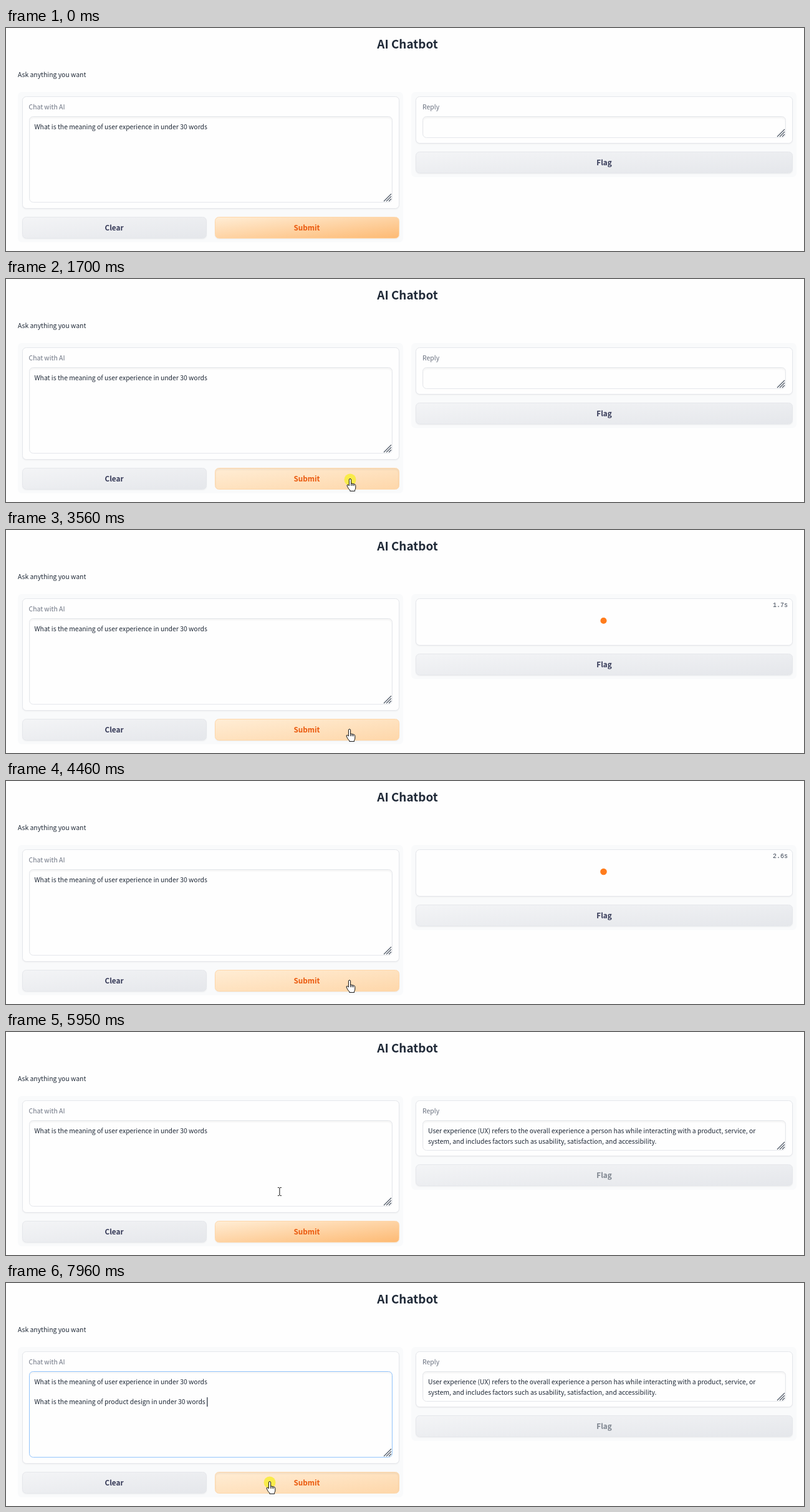
An HTML page for the animation above (7990 ms loop, 1280 by 359 pixels).

```html
<!DOCTYPE html>
<html lang="en">
<head>
<meta charset="utf-8">
<title>AI Chatbot</title>
<style>
html, body { margin: 0; width: 100%; height: 100%; overflow: hidden; background: #fefefe; }
#stage { position: absolute; left: 0; top: 0; width: 1280px; height: 359px; overflow: hidden; }
#stage div { position: absolute; box-sizing: border-box; border-radius: 6.5px; }
.panel { background: #f9fafb; }
.block, .area { background: #fefefe; border: 1px solid #e5e7eb; }
.block { box-shadow: 0 1px 2px rgba(0,0,0,.05); }
.area { box-shadow: inset 0 2px 3px rgba(0,0,0,.05); }
.area.focus { border-color: #93c5fd; }
.button { border: 1px solid #e5e7eb; background: linear-gradient(to bottom right, #f3f4f6, #e5e7eb); box-shadow: 0 1px 2px rgba(0,0,0,.05); }
.primary { border-color: #fed7aa; background: linear-gradient(to bottom right, #ffedd5, #fdba74); }
.primary.hover { background: linear-gradient(to bottom right, #ffedd5, #fed7aa); }
.primary.press { box-shadow: inset 0 2px 3px rgba(0,0,0,.06); }
svg { position: absolute; left: 0; top: 0; }
text { font: 10.4px "Noto Sans CJK JP", "Noto Sans CJK SC", "Noto Sans CJK", "Open Sans", sans-serif; fill: #1f2937; white-space: pre; }
.title { font-size: 18.9px; font-weight: 600; text-anchor: middle; }
.label { fill: #6b7280; }
.caption { font-size: 11.7px; font-weight: 600; text-anchor: middle; fill: #343856; }
.orange { fill: #ea580c; }
#timer { font: 10px "Liberation Mono", monospace; text-anchor: end; fill: #374151; }
.grip { fill: none; stroke: #4b5563; stroke-width: 1.1; }
</style>
</head>
<body>
<div id="stage">
  <svg id="top" width="1280" height="359">
    <circle id="spot" r="9.5" fill="#f8ec35"/>
    <rect id="caret" width="1.2" height="15" y="184" fill="#1f2937"/>
    <g id="mouse" stroke="#111" stroke-linejoin="round">
      <path id="hand" fill="#fff" d="M-1.6 11V1.2a1.6 1.6 0 0 1 3.2 0V7l1.9.3 1.9.5 1.8.5q1.6.6 1.6 2.2V14q0 2-1.2 3.6v1.8H-.2V18q-2.5-2-3.6-4.8l-1-2.2q-.5-1.5.9-1.9 1 0 2.3 1.9zM1.6 7v4M4 8v3M6.2 8.6v2.6"/>
      <path id="beam" fill="none" d="M-3-6.5h2l1 1 1-1h2M0-5.5v11M-3 6.5h2l1-1 1 1h2"/>
      <path id="arrow" fill="#fff" d="M0 0v15l3.5-3.3 2.3 5.3 2.2-1-2.3-5.1h4.8z"/>
    </g>
  </svg>
</div>
<script>
const LOOP = 7990;
const stage = document.getElementById('stage'), svg = document.getElementById('top');
const $ = id => document.getElementById(id);

function box(cls, x, y, w, h) {
  const el = document.createElement('div');
  el.className = cls;
  el.style.cssText = `left:${x}px;top:${y}px;width:${w}px;height:${h}px`;
  stage.insertBefore(el, svg);
  return el;
}
function node(tag, attrs, content = '') {
  const el = document.createElementNS('http://www.w3.org/2000/svg', tag);
  for (const k in attrs) el.setAttribute(k, attrs[k]);
  el.textContent = content;
  svg.insertBefore(el, $('spot'));
  return el;
}
const label = (x, y, s, cls = '') => node('text', { x, y, class: cls }, s);
const grip = (x, y) => node('path', {
  class: 'grip', transform: `translate(${x} ${y})`, d: 'M-12 0L0-12M-8 0L0-8M-4 0L0-4'
});
const show = (el, on) => { el.style.visibility = on ? 'visible' : 'hidden'; };

// left column
box('panel', 19, 103, 618, 242);
box('block', 25.5, 109.5, 605, 181);
const input = box('area', 36.5, 141.5, 583, 139);
box('button', 25.5, 303.5, 296, 35);
const submit = box('button primary', 334.5, 303.5, 296, 35);
label(644, 33, 'AI Chatbot', 'title');
label(19, 79, 'Ask anything you want');
label(36.5, 130.5, 'Chat with AI', 'label');
label(45.5, 163, 'What is the meaning of user experience in under 30 words');
const second = label(45.5, 195, 'What is the meaning of product design in under 30 words');
label(173.5, 326, 'Clear', 'caption');
label(482.5, 326, 'Submit', 'caption orange');
grip(618, 279);

// right column
const panel = box('panel', 650, 103, 618, 137);
const block = box('block', 656.5, 109.5, 605, 76);
const output = box('area', 667.5, 141.5, 583, 35);
const flag = box('button', 656.5, 198.5, 605, 35);
const replyLabel = label(668, 130.5, 'Reply', 'label');
const answer = [
  label(677, 163, 'User experience (UX) refers to the overall experience a person has while interacting with a product, service, or'),
  label(677, 179.5, 'system, and includes factors such as usability, satisfaction, and accessibility.')
];
const flagText = label(959.5, 221, 'Flag', 'caption');
const outGrip = grip(1249, 175);
const timer = label(1254, 124, '');
timer.id = 'timer';
const loader = node('circle', { cx: 958.5, cy: 146, fill: '#ff7c1c' });

// pointer path: time, x, y
const path = [
  [510, 524, 357], [850, 533, 271], [900, 535, 267], [1200, 552, 324],
  [1329, 552, 324], [1330, 552, 323], [1499, 552, 323], [1500, 552, 322],
  [2579, 552, 322], [2580, 551, 321], [5630, 551, 321], [6230, 348, 205],
  [7290, 348, 205], [7590, 424, 321], [7759, 424, 321], [7760, 423, 320]
];
const clicks = [1700, 6270, 7960];
const START = 1890, DONE = 4880, FOCUS = 6270, PASTE = 6900;

function pointer(t) {
  const i = path.findIndex(k => k[0] > t);
  if (i < 1) return path[path.length - 1].slice(1);
  const [a, b] = [path[i - 1], path[i]];
  const u = (t - a[0]) / (b[0] - a[0]), e = u * u * (3 - 2 * u);
  return [a[1] + (b[1] - a[1]) * e, a[2] + (b[2] - a[2]) * e];
}
const inside = (x, y, l, t, r, b) => x >= l && x <= r && y >= t && y <= b;

function draw(t) {
  const [x, y] = pointer(t);
  const moved = t >= 510;
  const overSubmit = moved && inside(x, y, 335, 304, 630, 338);
  const overInput = inside(x, y, 37, 142, 619, 280);
  show($('hand'), moved && overSubmit);
  show($('beam'), moved && overInput);
  show($('arrow'), moved && !overSubmit && !overInput);
  $('mouse').setAttribute('transform', `translate(${x} ${y})`);

  const since = Math.min(...clicks.filter(c => c <= t).map(c => t - c), 1e9);
  $('spot').setAttribute('transform', `translate(${x} ${y + 1})`);
  $('spot').setAttribute('opacity', .85 * Math.max(0, Math.min(1, (200 - since) / 100)));
  submit.classList.toggle('hover', overSubmit);
  submit.classList.toggle('press', overSubmit && since < 150);

  // request and reply
  const busy = t >= START && t < DONE, done = t >= DONE, grow = done ? 14 : 0;
  [output, replyLabel, outGrip].forEach(el => show(el, !busy));
  [timer, loader].forEach(el => show(el, busy));
  answer.forEach(el => show(el, done));
  timer.textContent = ((t - START) / 1000).toFixed(1) + 's';
  loader.setAttribute('r', 4.6 + 1.2 * Math.sin(Math.PI * (t - 1690) / 845) ** 2);
  panel.style.height = 137 + grow + 'px';
  block.style.height = 76 + grow + 'px';
  output.style.height = 35 + grow + 'px';
  flag.style.top = 198.5 + grow + 'px';
  flagText.setAttribute('y', 221 + grow);
  outGrip.setAttribute('transform', `translate(1249 ${175 + grow})`);
  const fade = Math.max(0, Math.min(1, (t - DONE) / 150));
  flagText.style.fill = `rgb(${52 + 72 * fade},${56 + 75 * fade},${86 + 55 * fade})`;

  // follow-up question, caret blinking every half second
  const pasted = t >= PASTE;
  input.classList.toggle('focus', t >= FOCUS);
  show(second, pasted);
  $('caret').setAttribute('x', pasted ? 322.2 : 46);
  show($('caret'), t >= FOCUS && Math.floor((t - (pasted ? PASTE : FOCUS)) / 500) % 2 === 0);
}

const begin = performance.now();
(function tick() {
  draw((performance.now() - begin) % LOOP);
  requestAnimationFrame(tick);
})();
</script>
</body>
</html>
```
